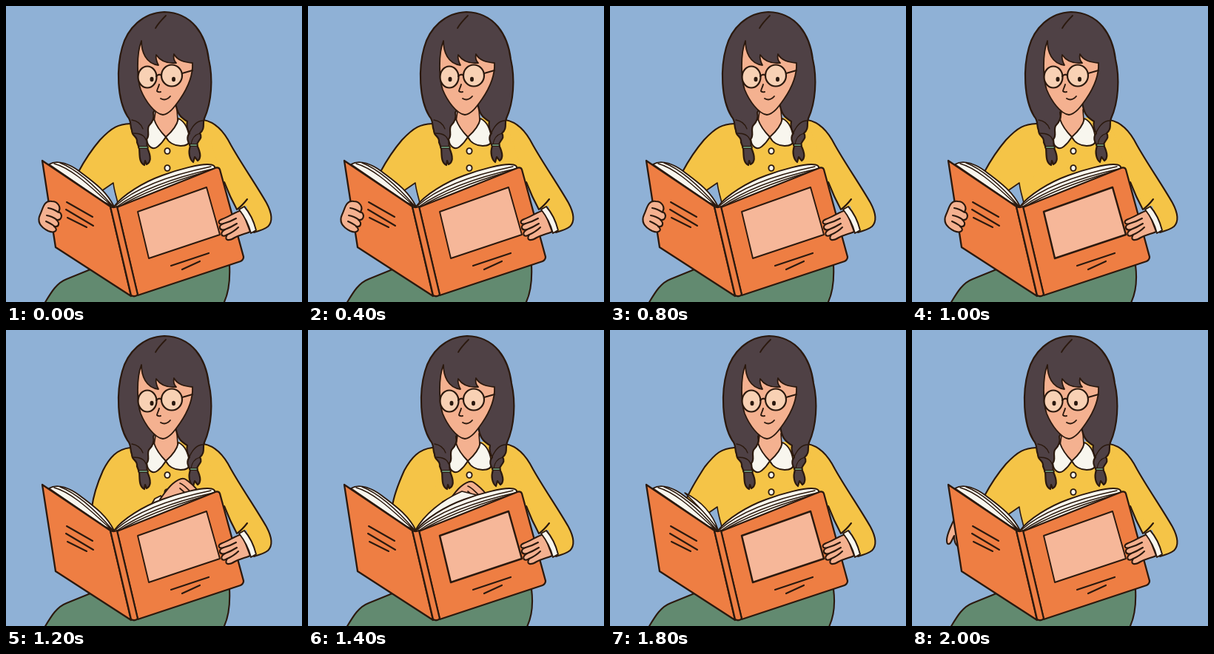
An HTML page with a canvas for the animation above (2.2 s loop, 400x400 px).

```html
<!DOCTYPE html>
<html lang="en">
<head>
<meta charset="utf-8">
<title>Reading</title>
<style>
html, body { margin: 0; width: 100%; height: 100%; overflow: hidden; background: #8fb1d6; }
canvas { display: block; width: 100vmin; height: 100vmin; }
</style>
</head>
<body>
<canvas id="stage" width="400" height="400"></canvas>
<script>
const ctx = document.getElementById('stage').getContext('2d');
const STEP = 200, STEPS = 11;
const SKY = '#8fb1d6', HAIR = '#4f4145', SKIN = '#f4b190', LENS = '#f8d1b4', YELLOW = '#f5c447',
  ORANGE = '#ee7e43', LABEL = '#f6b799', GREEN = '#628a70', PAPER = '#f8f6ee', INK = '#2b190e';

// Horizontal gaze for each drawing
const GAZE = [0, -3, -5, -3, 0, 0, 0, -3, -5, -5, -5];

function line(d, width = 2.1, color = INK) {
  ctx.strokeStyle = color;
  ctx.lineWidth = width;
  ctx.stroke(new Path2D(d));
}

function shape(d, fill, width = 2.1) {
  ctx.fillStyle = fill;
  ctx.fill(new Path2D(d));
  if (width) line(d, width);
}

function oval(x, y, rx, ry, fill, width = 2) {
  ctx.beginPath();
  ctx.ellipse(x, y, rx, ry, 0, 0, Math.PI * 2);
  ctx.fillStyle = fill;
  ctx.fill();
  if (width) {
    ctx.strokeStyle = INK;
    ctx.lineWidth = width;
    ctx.stroke();
  }
}

function skirt(alt) {
  const x = alt ? 1.5 : 0;
  shape(`M52 402 C62 385 69 374 82 369 L114 356 L302 350 C${303 + x} 370 ${301 + x} 388 ${294 + x} 402 Z`, GREEN);
}

// Outer edge of the turning arm
function armEdge(step) {
  if (step === 6) return 'C150 161 140 172 131 190 C123 208 118 224 116 240';
  if (step === 7) return 'C150 161 140 172 130 190 C122 208 116 223 114 238';
  if (step === 8) return 'C150 161 140 172 130 190 C121 208 114 222 111 235';
  if (step === 9) return 'C151 160 143 166 128 185 C117 202 109 215 103 229';
  return 'C152 160 144 163 127 181 C115 195 106 209 98 224';
}

function sweater(step) {
  const left = 'M168 159 ' + armEdge(step);
  const right = 'C284 157 296 172 304 188 C318 213 337 240 352 266 C360 281 360 292 354 298 C349 302 342 304 335 306';
  ctx.fillStyle = YELLOW;
  const fill = new Path2D(left + ' L147 275 L285 260 L196 152 Z');
  ctx.fill(fill);
  shape('M196 152 L147 275 L285 250 L295 238 L312 275 L325 270 L335 306 L354 298 L267 154 L238 151 Z', YELLOW, 0);
  shape('M267 154 ' + right + ' L325 270 L295 238 Z', YELLOW, 0);
  line(left);
  line('M267 154 ' + right);
  line('M295 238 C300 251 306 264 312 275 M312 275 Q319 270 326 261');
  if (step < 6 || step > 8) {
    shape('M131 249 L145 239 L151 266 L146 270 Z', SKY, 0);
    line('M129 250 L145 239 C146 249 149 257 151 266', 1.6);
  }
}

function collar() {
  shape('M201 140 L199 158 L216 178 L233 156 L231 136 Z', SKIN, 0);
  line('M202 143 L200 156 M231 140 L232 154', 1.6);
  shape('M200 153 C194 155 189 164 190 179 C191 191 199 195 205 190 C210 186 213 182 216 177 C209 170 203 162 200 153 Z', PAPER, 1.9);
  shape('M233 152 C231 162 224 170 216 177 C220 185 228 189 236 189 C244 189 248 187 248 181 C247 168 243 157 233 152 Z', PAPER, 1.9);
  oval(218, 196, 3.6, 3.9, PAPER, 1.9);
  oval(218, 219, 3.6, 3.9, PAPER, 1.9);
}

function hair(alt) {
  ctx.save();
  ctx.translate(alt ? 1 : 0, 0);
  shape('M214 8 C185 9 164 30 157 56 C149 84 150 126 164 149 C170 155 167 161 170 168' +
    ' C170 177 178 175 177 184 L180 192 C181 200 179 211 187 215 L188 209 L190 214 C196 211 196 203 191 192' +
    ' L190 180 C195 175 190 168 193 162 C198 157 201 151 199 144 L206 132 L229 130' +
    ' C231 145 235 150 245 156 C243 164 246 168 248 172 C243 178 246 184 249 189' +
    ' C246 198 248 207 253 211 L255 204 L259 209 C265 205 262 196 258 188' +
    ' C258 182 267 179 262 172 C270 165 265 159 268 152 C278 130 280 98 274 72 C270 39 252 9 214 8 Z', HAIR, 2.2);
  line('M216 13 C211 18 206 23 202 30', 1.8);
  line('M170 154 C177 155 182 158 185 166 M172 172 C179 172 187 174 189 181', 1.3);
  line('M266 155 C259 155 253 160 248 171 M262 172 C255 174 251 180 250 187', 1.3);
  line('M180 191 L191 191', 3.8);
  line('M181 191 L190 191', 1.8, GREEN);
  line('M249 188 L258 188', 3.8);
  line('M250 188 L257 188', 1.8, GREEN);
  ctx.restore();
}

function face(gaze) {
  shape('M183 47 C183 62 189 78 206 80 C203 74 202 70 203 66 C209 75 218 78 230 77 C226 73 226 69 227 65' +
    ' C232 74 241 76 252 77 C253 96 244 113 235 126 C228 136 221 146 212 147 C201 146 188 128 182 113 C177 98 176 65 183 47 Z', SKIN, 1.8);
  oval(191, 96, 12.5, 14.5, LENS, 2.2);
  oval(224, 94, 14, 14.5, LENS, 2.2);
  line('M203 95 Q207 91 210 94 M238 91 L252 87', 2.1);
  oval(197 + gaze, 99, 2.5, 3.3, INK, 0);
  oval(226.5 + gaze, 99, 2.5, 3.3, INK, 0);
  line('M207 106 C206 110 204 113 204 115 Q206 117 209 116', 1.9);
  line('M209 125 Q216 129 222 122', 1.9);
}

function fist(dx, dy) {
  ctx.save();
  ctx.translate(dx, dy);
  shape('M197 235 L201 228 L209 224 L214 234 L204 244 Z', PAPER, 1.8);
  shape('M208 229 C213 222 219 213 225 208 C232 202 239 199 243 202 C250 207 256 213 259 217 L248 225 L209 240 Z', SKIN, 2);
  line('M235 207 C241 209 245 215 250 219 M235 214 L243 221', 1.7);
  ctx.restore();
}

// The page being carried across the book
function turningPage(step) {
  if (step === 6) fist(0, 0);
  if (step === 7) {
    fist(-19, 4);
    shape('M145 271 C157 249 181 230 208 218 L232 224 C203 233 171 247 151 270 Z', PAPER, 1.8);
  }
  if (step === 8) {
    shape('M143 271 C151 253 166 232 183 223 L201 234 C184 241 166 251 150 269 Z', PAPER, 1.8);
  }
}

function rearHand() {
  shape('M57 256 C52 266 47 276 47 284 C47 291 51 291 54 284 L57 278 C57 287 60 292 64 293 L66 262 Z', SKIN);
}

function pages(step) {
  shape('M58 214 C70 207 87 214 100 224 C117 237 135 249 146 271 L134 266 Z', PAPER, 1.9);
  line('M65 213 C91 220 119 249 142 269 M73 212 C99 222 123 246 144 270', 1.4);
  if (step === 9) shape('M146 270 C138 246 121 230 101 220 C115 234 132 250 146 270 Z', PAPER, 1.6);
  shape('M146 271 C158 255 186 238 211 229 C235 220 261 214 272 214 C281 214 284 217 281 221 L153 274 Z', PAPER, 1.9);
  line('M148 270 C178 243 229 227 277 217 M150 271 C184 247 231 231 280 220 M151 272 C186 251 229 236 270 224', 1.4);
}

function book(alt) {
  shape('M49 209 L141 271 L169 392 L67 326 Z', ORANGE, 2.3);
  shape('M150 272 L284 218.5 Q288 218 289 221 L321 339 Q321 343 317 345 L178 391 Z', ORANGE, 2.3);
  shape('M141 271 Q145 273 150 271 L178 390 Q174 394 169 391 Z', ORANGE, 2.3);
  shape('M178 278 L271 245 L289 309 L193 341 Z', LABEL, alt ? 2.5 : 1.9);
  line('M82 265 L117 285 M81 275 L118 297 M83 286 L109 299', 2.1);
  line('M223 351 L274 334 M238 356 L262 345', 2.2);
}

function leftHand() {
  shape('M62 264 C51 262 50 274 46 282 C41 293 49 300 57 304 C67 308 71 302 65 298' +
    ' C72 299 73 293 68 289 C76 290 77 281 71 278 C75 272 70 264 62 264 Z', SKIN);
  line('M57 273 Q64 274 71 279 M55 283 Q62 284 69 289 M54 291 Q59 293 66 298');
}

function rightHand() {
  shape('M319 276 C310 278 301 285 292 288 C285 291 287 296 294 294 C286 297 288 304 296 302' +
    ' C288 307 291 314 299 309 C294 317 301 318 309 313 C317 309 323 308 330 305 Z', SKIN);
  line('M294 294 Q302 292 311 287 M296 302 Q304 299 312 294 M299 309 Q308 305 314 299');
  shape('M315 275 L322 271 C329 279 335 291 338 303 L331 307 C328 295 322 284 315 275 Z', PAPER, 1.9);
}

function draw(time) {
  const step = Math.floor(time % (STEP * STEPS) / STEP);
  const alt = step % 2 === 1;
  ctx.fillStyle = SKY;
  ctx.fillRect(0, 0, 400, 400);
  ctx.lineJoin = ctx.lineCap = 'round';
  skirt(alt);
  sweater(step);
  collar();
  hair(alt);
  face(GAZE[step]);
  turningPage(step);
  if (step === 10) rearHand();
  pages(step);
  book(alt);
  if (step < 6) leftHand();
  rightHand();
}

const start = performance.now();
function loop() {
  draw(performance.now() - start);
  requestAnimationFrame(loop);
}
loop();
</script>
</body>
</html>
```
